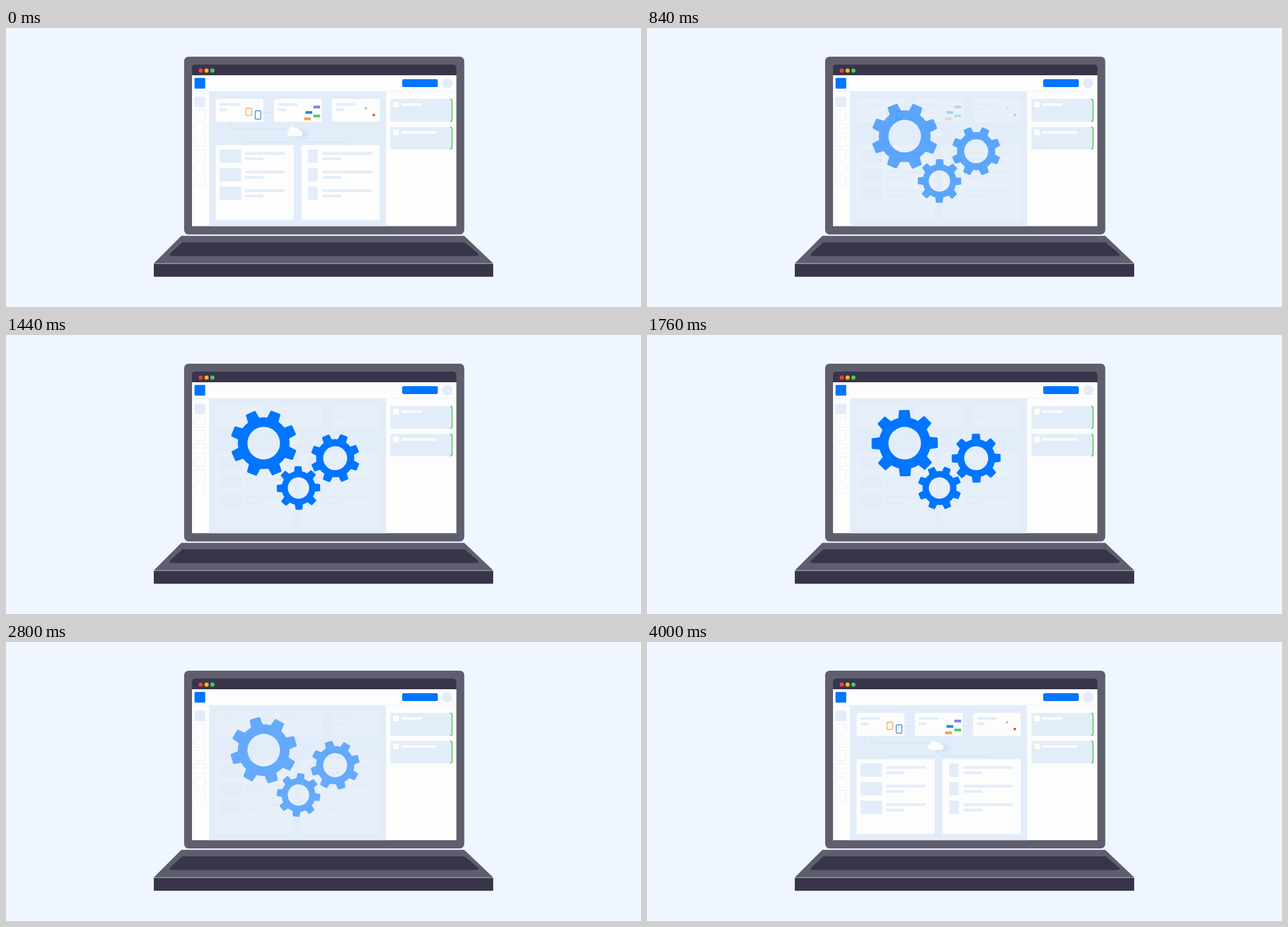
An HTML page for the animation above (4.04 s loop, 1130 by 496 pixels).

```html
<!DOCTYPE html>
<html lang="en">
<head>
<meta charset="utf-8">
<title>Laptop with gears</title>
<style>
  html, body { margin: 0; width: 100%; height: 100%; overflow: hidden; background: #eff6ff; }
  svg { display: block; width: 1130px; height: 496px; }
</style>
</head>
<body>
<svg viewBox="0 0 1130 496">
  <defs>
    <radialGradient id="shade">
      <stop offset="0" stop-color="#b9d2f0" stop-opacity=".5"/>
      <stop offset="1" stop-color="#b9d2f0" stop-opacity="0"/>
    </radialGradient>
  </defs>

  <!-- laptop -->
  <rect x="317" y="51" width="498.5" height="316" rx="8" fill="#5f5e6e"/>
  <path d="M331 84V71q0-6 6-6H795.5q6 0 6 6V84z" fill="#38354a"/>
  <rect x="331" y="84" width="470.5" height="268.3" fill="#fdfdfd"/>
  <path d="M312 369.5H815.5L867 418.5H263z" fill="#5f5e6e"/>
  <path d="M314 381H816L840 401Q843 405.5 836 405.5H296Q289 405.5 292 401z" fill="#38354a"/>
  <rect x="263" y="419.3" width="604" height="23" rx="1" fill="#38354a"/>
  <circle cx="346.5" cy="75.7" r="3.7" fill="#fc3b41"/>
  <circle cx="356.9" cy="75.7" r="3.7" fill="#fdbc07"/>
  <circle cx="367.3" cy="75.7" r="3.7" fill="#47c862"/>

  <!-- window chrome -->
  <rect x="335.5" y="88.7" width="19" height="19" rx="1.5" fill="#0075ff"/>
  <rect x="705" y="91" width="63.5" height="14" rx="3" fill="#0075ff"/>
  <circle cx="785" cy="98" r="9.5" fill="#e3edf9"/>
  <path d="M331 112.5H801.5" stroke="#e9f0fa"/>
  <rect x="361.5" y="113" width="315" height="239.3" fill="#e3edf9"/>
  <g id="chrome"></g>

  <!-- workspace -->
  <g id="plates">
    <g fill="none" stroke="#bdd5f2" stroke-width=".9" stroke-dasharray="2 1">
      <path d="M458 149.8H477M561 149.8H580.5"/>
      <path d="M399.5 167V170Q400 179.7 410 179.7H502"/>
      <path d="M422.5 208Q423 203 430 203H508Q516.5 203 516.5 192Q516.5 203 525 203H602Q609 203 609.5 208"/>
    </g>
    <ellipse cx="527" cy="189" rx="16" ry="13" fill="url(#shade)"/>
    <path d="M505.5 192A5 5 0 0 1 503 182.5A7.5 7.5 0 0 1 516 178.5A6 6 0 0 1 523.5 183A4.6 4.6 0 0 1 524.5 192z" fill="#fdfdfd"/>
  </g>
  <g id="icons">
    <rect x="427" y="142.5" width="10.3" height="13" rx="1.5" fill="none" stroke="#f5a05a" stroke-width="1.4"/>
    <rect x="443.5" y="147.2" width="10" height="14.8" rx="1.5" fill="none" stroke="#2f86d8" stroke-width="1.4"/>
    <rect x="547" y="138" width="12" height="5" rx=".5" fill="#8483e3"/>
    <rect x="533" y="147.7" width="12" height="4.8" rx=".5" fill="#2486e6"/>
    <rect x="547" y="154" width="12" height="4.8" rx=".5" fill="#52c968"/>
    <rect x="530.7" y="159" width="11.8" height="5" rx=".5" fill="#f6a04f"/>
    <path d="M639.3 140.2L642.6 142.7L639.3 145.2z" fill="#3fc45a"/>
    <rect x="652.7" y="152.8" width="3.8" height="3.8" fill="#dc3530"/>
  </g>
  <g id="gears" fill="#0075ff" fill-rule="evenodd"></g>
</svg>
<script>
const LOOP = 4040, STEP = 40;
const DEG_PER_MS = 0.072;
const PALE = '#e3edf9', WHITE = '#fdfdfd';
const byId = id => document.getElementById(id);

function add(parent, tag, attrs) {
  const node = document.createElementNS('http://www.w3.org/2000/svg', tag);
  for (const key in attrs) node.setAttribute(key, attrs[key]);
  return parent.appendChild(node);
}
const box = (parent, x, y, width, height, rx, fill, extra) =>
  add(parent, 'rect', { x, y, width, height, rx, fill, ...extra });

const chrome = byId('chrome'), plates = byId('plates'), gears = byId('gears');

// sidebar
box(chrome, 335.5, 122, 19, 18.7, 1.5, PALE);
for (let i = 1; i < 7; i++)
  box(chrome, 336, 122.3 + i * 23.5, 18, 18, 1.5, WHITE, { stroke: '#e3edf9' });

// side panel cards
for (const [y, height, line] of [[126, 40.7, 36], [175.7, 39.7, 62]]) {
  box(chrome, 684, y, 109.5, height, 3, PALE);
  box(chrome, 689, y + 5, 10, 10, 1, WHITE);
  box(chrome, 703.5, y + 7.7, line, 4.6, 1.5, WHITE);
  add(chrome, 'path', {
    d: `M790.5 ${y + .5}Q793.7 ${y + .5} 793.7 ${y + 4}V${y + height - 4}Q793.7 ${y + height - .5} 790.5 ${y + height - .5}`,
    fill: 'none', stroke: '#5ccb70', 'stroke-width': 2
  });
}

// top row
for (const x of [373, 476.7, 580.2]) {
  box(plates, x, 126, 85, 40.7, 3, WHITE);
  box(plates, x + 7, 133.5, 35, 4.7, 1.5, PALE);
  box(plates, x + 7, 143, 14, 4.7, 1.5, PALE);
}

// lists
for (const [x, thumbX, thumbW, lineX, lineW] of [
  [373, 380, 38.5, 425, 71], [526, 537.7, 17, 563.5, 87.5]
]) {
  box(plates, x, 208.3, 139, 133, 3, WHITE);
  for (let i = 0; i < 3; i++) {
    const y = 216 + i * 33;
    box(plates, thumbX, y, thumbW, 23.8, 1.5, PALE);
    box(plates, lineX, y + 4.7, lineW, 4.8, 1.5, PALE);
    box(plates, lineX, y + 14.2, 33, 4.8, 1.5, PALE);
  }
}

// eight-toothed gear in unit size, with a round hole
function gearPath() {
  const point = (radius, deg) => {
    const a = deg * Math.PI / 180;
    return `${(radius * Math.sin(a)).toFixed(2)} ${(-radius * Math.cos(a)).toFixed(2)}`;
  };
  let d = '';
  for (let a = 0; a < 360; a += 45) {
    d += `${a ? 'L' : 'M'}${point(46, a - 13.5)}L${point(58.4, a - 9.3)}` +
         `Q${point(59.6, a - 8.6)} ${point(59.4, a - 7.4)}L${point(59.4, a + 7.4)}` +
         `Q${point(59.6, a + 8.6)} ${point(58.4, a + 9.3)}L${point(46, a + 13.5)}` +
         `A46 46 0 0 1 ${point(46, a + 31.5)}`;
  }
  return d + 'zM29 0A29 29 0 1 0-29 0A29 29 0 1 0 29 0z';
}
const wheels = [
  { x: 458.6, y: 192.3, scale: 1, phase: 7.6 },
  { x: 585.8, y: 219, scale: .737, phase: 7.6 },
  { x: 520.5, y: 272, scale: .655, phase: 30.1 }
].map(w => ({ ...w, node: add(gears, 'path', { d: gearPath() }) }));

// opacity tracks as [ms, value]
const fades = {
  plates: [[0, 1], [440, 1], [860, .18], [2960, .18], [3480, 1], [LOOP, 1]],
  icons: [[0, 1], [500, 1], [1000, 0], [2880, 0], [3280, 1], [LOOP, 1]],
  gears: [[0, 0], [600, 0], [1000, 1], [2640, 1], [3000, 0], [LOOP, 0]]
};
function valueAt(track, t) {
  const i = track.findIndex(([time]) => time > t);
  const [t0, v0] = track[i - 1], [t1, v1] = track[i];
  return v0 + (v1 - v0) * (t - t0) / (t1 - t0);
}

function draw(t) {
  for (const id in fades) byId(id).setAttribute('opacity', valueAt(fades[id], t));
  for (const { node, x, y, scale, phase } of wheels)
    node.setAttribute('transform',
      `translate(${x} ${y}) rotate(${phase + t * DEG_PER_MS}) scale(${scale})`);
}

const start = performance.now();
function tick() {
  const t = (performance.now() - start) % LOOP;
  draw(Math.floor(t / STEP) * STEP);
  requestAnimationFrame(tick);
}
tick();
</script>
</body>
</html>
```
